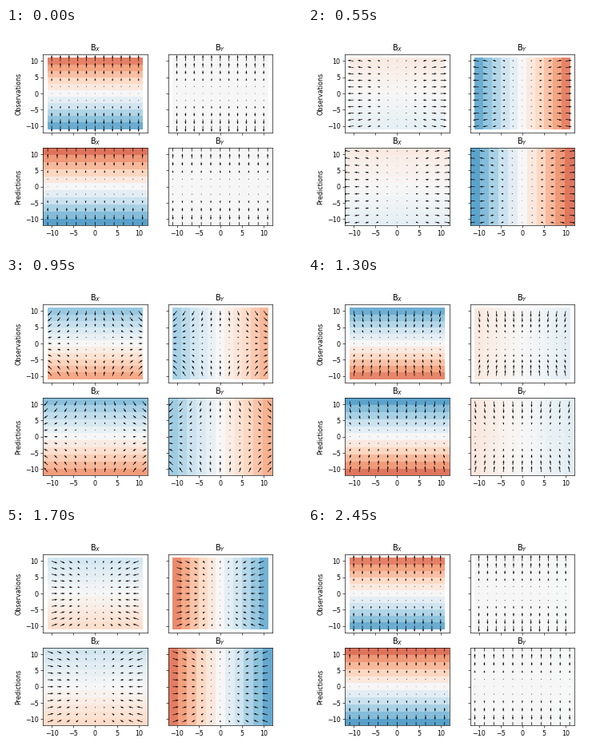
These frames come from a looping animation (370 by 278 pixels, 2500 ms). A matplotlib script:

```python
import numpy as np
import matplotlib.pyplot as plt
from matplotlib.animation import FuncAnimation

WIDTH, HEIGHT, DPI = 370, 278, 57.8125
FRAMES, INTERVAL = 50, 50
CELLS = 11
LIMIT = 12
VMAX = 20

plt.rcParams["font.family"] = "DejaVu Sans"
fig, axes = plt.subplots(
    2, 2, sharex=True, sharey=True, dpi=DPI,
    figsize=((WIDTH + 1e-6) / DPI, (HEIGHT + 1e-6) / DPI))


class FieldRow:
    """Two colour maps of the field components with the same arrows on top."""

    def __init__(self, row, label, extent):
        edges = np.linspace(-extent, extent, CELLS + 1)
        centers = (edges[:-1] + edges[1:]) / 2
        self.x, self.y = np.meshgrid(centers, centers)
        scale = 1.8 * CELLS * np.hypot(self.x, self.y).mean()
        self.maps, self.arrows = [], []
        for ax, name in zip(row, "XY"):
            self.maps.append(ax.pcolormesh(
                edges, edges, np.zeros_like(self.x),
                cmap="RdBu_r", vmin=-VMAX, vmax=VMAX))
            self.arrows.append(ax.quiver(
                self.x, self.y, self.x, self.y, scale=scale))
            ax.set_title(f"B$_{name}$")
        row[0].set_ylabel(label)

    def update(self, angle):
        bx = self.y * np.cos(angle)
        by = self.x * np.sin(angle)
        for mesh, values in zip(self.maps, (bx, by)):
            mesh.set_array(values)
        for quiver in self.arrows:
            quiver.set_UVC(by, bx)


rows = [FieldRow(axes[0], "Observations", 11),
        FieldRow(axes[1], "Predictions", 12)]

ticks = np.arange(-10, 11, 5)
axes[0, 0].set(xlim=(-LIMIT, LIMIT), ylim=(-LIMIT, LIMIT),
               xticks=ticks, yticks=ticks)


def update(frame):
    # The sweep includes both ends, so the last pose equals the first.
    angle = 2 * np.pi * frame / (FRAMES - 1)
    for row in rows:
        row.update(angle)
    return [artist for row in rows for artist in row.maps + row.arrows]


anim = FuncAnimation(fig, update, frames=FRAMES, interval=INTERVAL,
                     init_func=lambda: update(0), repeat=True, repeat_delay=0)
plt.show()
```
